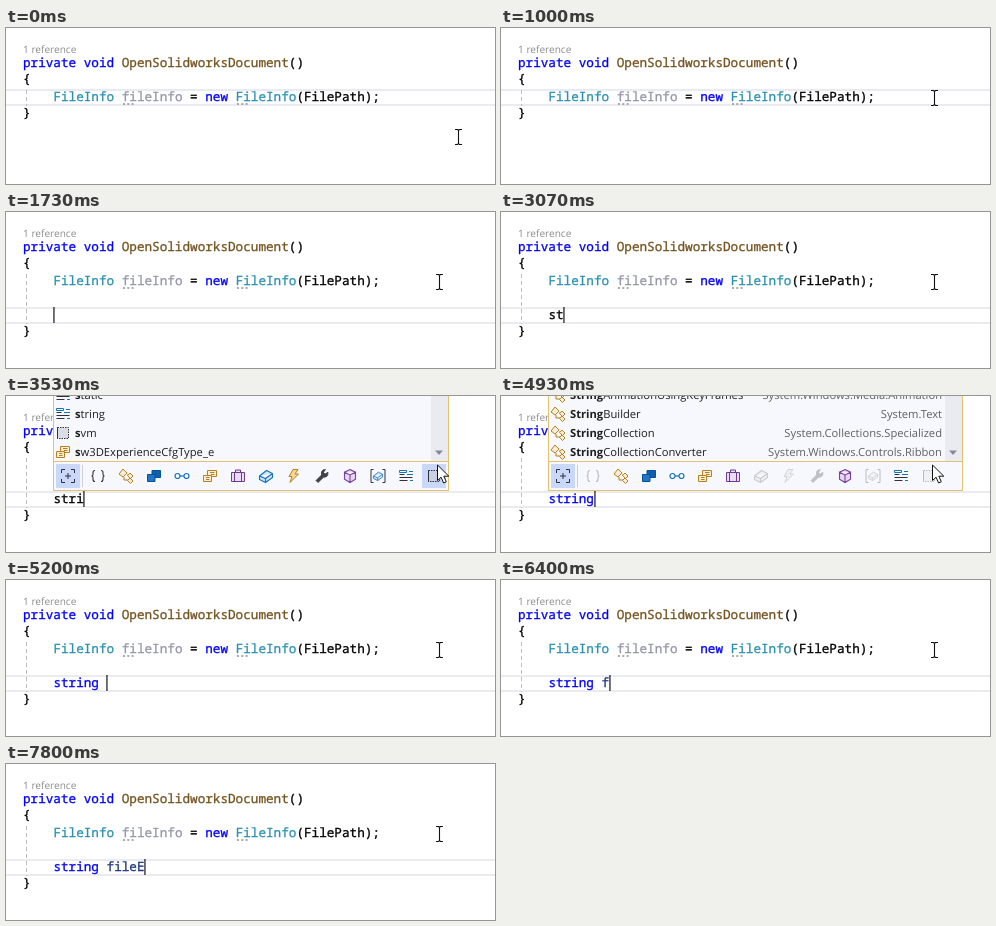
Recreate the animation shown at these times as an HTML page. Size 489 by 156 pixels, loop 8 s.

```html
<!DOCTYPE html>
<html lang="en">
<head>
<meta charset="utf-8">
<title>Code completion</title>
<style>
html, body { margin: 0; width: 100%; height: 100%; overflow: hidden; background: #fff; }
svg { display: block; }
text { white-space: pre; text-rendering: geometricPrecision; }
.code { color: #000; }
.code text, .code tspan { fill: currentColor; stroke: currentColor; stroke-width: .3; }
.code text { font: 12.667px "Noto Sans Mono", monospace; }
.ui { font: 11.2px "Open Sans", "Noto Sans", sans-serif; fill: #1e1e1e; }
.ui .hit { font-weight: 700; }
.lens { font: 10.1px "Open Sans", "Noto Sans", sans-serif; fill: #8c8c8c; }
.kw { color: #00f; }
.type { color: #2b91af; }
.fn { color: #74531f; }
.dim { color: #9496a8; }
.var { color: #1f377f; }
.space { fill: #616161; text-anchor: end; }
.filtered .alt { filter: grayscale(1); opacity: .3; }
.line { fill: none; stroke: #303036; }
</style>
</head>
<body>
<svg width="489" height="156" viewBox="0 0 489 156">
  <defs>
    <g id="expand" class="line">
      <path d="M-6.500-3v-3.500h3.500M3-6.500h3.500v3.500M6.500 3v3.500h-3.500M-3 6.500h-3.500v-3.500M-3 0h6M0-3v6"/>
    </g>
    <g id="braces" class="line" stroke-width="1.1">
      <path id="brace" d="M-3-5.500q-2 0-2 2v2q0 1.500-1.500 1.500q1.500 0 1.500 1.500v2q0 2 2 2"/>
      <use href="#brace" transform="scale(-1 1)"/>
    </g>
    <g id="class" fill="#f8edd8" stroke="#b7801d">
      <path d="M-7-2l4-5 4 4-4 4zM1-1h3M-2 1v3h4"/>
      <path d="M4-3l3 3-2.500 2.500-3-3zM4 2l3 3-2.500 2.500-3-3z"/>
    </g>
    <g id="struct" fill="#0f5fae" stroke="#00539c">
      <path d="M-2-5.500h8.500v7h-8.500z"/>
      <path d="M-6.500-1.500h7.500v7h-7.500z" fill="#2476c2"/>
    </g>
    <g id="iface" class="line" style="stroke:#1272ba" stroke-width="1.2">
      <circle cx="-4.500" r="2.500"/><circle cx="4.500" r="2.500"/><path d="M-2 0h4"/>
    </g>
    <g id="enum" fill="#f8edd8" stroke="#b7801d">
      <path d="M-2.500-5.500h9v6h-9zM0-3.500h4.500M1-1.500h3.500"/>
      <path d="M-6.500-.5h8v6h-8zM-4 1.500h3.500M-4 3.500h3.500"/>
    </g>
    <g id="case" fill="#eadcf2" stroke="#6f3a96">
      <path d="M-6.500-3.500h13v9h-13zM-2.500-3.500v-2.500h5v2.500M-3.500-3.500v9M3.500-3.500v9"/>
    </g>
    <g id="field" fill="#cfe4f6" stroke="#1272ba" stroke-width="1.100">
      <path d="M-6.500 0l7-5.500 6 3v4l-7 5-6-3zM-6.500 0l6 2.500 7-5M-.5 2.500v4"/>
    </g>
    <path id="bolt" d="M-1-6.500h5l-3 4.500h3.500l-8.500 8.500 2-6h-3z" fill="#f6d795" stroke="#b7801d"/>
    <path id="wrench" d="M-6 4.500l5.500-5.500q-1-4 2-5.200l2-.3-2 2.800 1.500 1.800 3-1.800q.5 5-4.500 5l-5.500 5.300z" fill="#42424a" stroke="#303036" stroke-width=".7"/>
    <g id="cube" fill="#e7d6f1" stroke="#7941a3" stroke-width="1.100">
      <path d="M0-6.500l5.500 2.700v7l-5.500 3.300-5.500-3.300v-7zM-5.500-3.800l5.500 2.800 5.500-2.800M0-1v7.500"/>
    </g>
    <g id="boxed">
      <path class="line" d="M-4.500-6.500h-2.500v13h2.500M4.500-6.500h2.500v13h-2.500"/>
      <use href="#field" transform="scale(.7)"/>
    </g>
    <g id="lines" class="line">
      <path d="M-6.500-1.500h5M-6.500 1.500h13M-6.500 4.500h8"/>
      <path d="M-6.500-5.500h7v2h-7zM3-4.500h4M1-1.500h6M4 4.500h3" style="stroke:#1272ba"/>
    </g>
    <g id="snippet">
      <path d="M-5-5h10v10h-10z" fill="#c9cbd2" fill-opacity=".6"/>
      <path class="line" d="M-5.500-5.500h11v11h-11z" stroke-dasharray="1.500 1"/>
      <path class="line" d="M-5.500-5.500v11"/>
    </g>
  </defs>

  <rect width="489" height="156" fill="#fff"/>
  <rect id="current" x="-2" y="62" width="493" height="15" fill="none" stroke="#eaeaf3" stroke-width="2"/>
  <path id="guide" stroke="#bdbdbd" stroke-dasharray="4 3"/>
  <text class="lens" x="17" y="25">1 reference</text>
  <g class="code">
    <text x="17" y="39"><tspan class="kw">private void</tspan> <tspan class="fn">OpenSolidworksDocument</tspan>()</text>
    <text x="17" y="55">{</text>
    <text x="47.400" y="73"><tspan class="type">FileInfo</tspan> <tspan class="dim">fileInfo</tspan> = <tspan class="kw">new</tspan> <tspan class="type">FileInfo</tspan>(FilePath);</text>
    <path d="M117 76h11M231 76h11" stroke="#8f8f8f" stroke-width="1.500" stroke-dasharray="2 2.300"/>
    <text x="47.400" y="107"><tspan id="word"></tspan><tspan id="rest" class="var"></tspan></text>
    <text id="close" x="17">}</text>
  </g>
  <rect id="caret" width="1.100" height="16"/>

  <g id="popup">
    <rect id="frame" x="47.500" y="-2" height="96.500" fill="#f6f8fd" stroke="#e3c36f"/>
    <g id="scroll">
      <path d="M425-1h17v66h-17z" fill="#e9ebf1"/>
      <path d="M429 54.500h8l-4 4.500z" fill="#868999"/>
    </g>
    <g id="list"></g>
    <path id="divider" stroke="#e3c36f"/>
    <path d="M50 68h24v24h-24z" fill="#c9d7f8"/>
    <path id="hover" d="M416 68h24v24h-24z" fill="#c9d7f8"/>
    <path d="M76.500 69v22" stroke="#ccced9"/>
    <g id="bar"></g>
  </g>
  <g id="tip">
    <path d="M431.500 86.500h70v25h-70z" fill="#f5f7fc" stroke="#9ba7c0"/>
    <text class="ui" x="438" y="104">Show only snippets</text>
  </g>
  <path id="beam" d="M-3.500-7.500h2.500l1 1 1-1h2.500M0-6.500v13M-3.500 7.500h2.500l1-1 1 1h2.500" fill="none" stroke="#111" stroke-width="1.100"/>
  <path id="arrow" transform="translate(431.500 69)" d="M0 0v15.500l3.600-3.300 2.500 5.800 2.700-1.200-2.500-5.600h5z" fill="#fff" stroke="#111"/>
</svg>
<script>
const $ = id => document.getElementById(id);
const set = (id, name, value) => $(id).setAttribute(name, value);
const show = (id, on) => { $(id).style.display = on ? '' : 'none'; };
const LOOP = 8000, LEFT = 47.4, CHAR = 7.6;

const tools = ['expand', 'braces', 'class', 'struct', 'iface', 'enum', 'case',
  'field', 'bolt', 'wrench', 'cube', 'boxed', 'lines', 'snippet'];
const unavailable = ['braces', 'field', 'bolt', 'wrench', 'boxed', 'snippet'];

const lists = {
  all: {
    right: 442.5,
    rows: [['lines', 'static'], ['lines', 'string'], ['snippet', 'svm'], ['enum', 'sw3DExperienceCfgType_e']]
  },
  types: {
    right: 461.5,
    rows: [
      ['class', 'StringAnimationUsingKeyFrames', 'System.Windows.Media.Animation'],
      ['class', 'StringBuilder', 'System.Text'],
      ['class', 'StringCollection', 'System.Collections.Specialized'],
      ['class', 'StringCollectionConverter', 'System.Windows.Controls.Ribbon']
    ]
  }
};

// Each step changes only the listed parts of the state.
const steps = [
  [0, { row: 2, text: '', caret: false, list: '', hits: 1, tip: false }],
  [530, { caret: true }],
  [1000, { caret: false }],
  [1470, { row: 3, caret: true }],
  [1730, { row: 4 }],
  [2270, { caret: false }],
  [2530, { text: 's', caret: true }],
  [3070, { text: 'st' }],
  [3530, { text: 'stri', list: 'all' }],
  [4130, { tip: true }],
  [4330, { list: 'types', hits: 4, caret: false }],
  [4530, { text: 'strin', tip: false, caret: true }],
  [4670, { text: 'string' }],
  [4930, { hits: 6 }],
  [5200, { text: 'string ', list: '' }],
  [5730, { caret: false }],
  [6130, { text: 'string f', caret: true }],
  [6600, { text: 'string fi' }],
  [6870, { text: 'string fil' }],
  [7200, { text: 'string file' }],
  [7670, { caret: false }],
  [7800, { text: 'string fileE', caret: true }]
];

const icon = (name, x, y, cls = '') =>
  `<use href="#${name}" class="${cls}" transform="translate(${x} ${y})"/>`;

$('bar').innerHTML = tools.map((name, i) =>
  icon(name, i ? 64 + i * 28 : 62, 80, unavailable.includes(name) ? 'alt' : '')).join('');

function drawList({ right, rows }, hits) {
  set('frame', 'width', right - 47.5);
  set('divider', 'd', `M48 65.5H${right}`);
  set('scroll', 'transform', `translate(${right - 442.5})`);
  $('list').innerHTML = rows.map(([kind, label, space = ''], i) => {
    const y = i * 19 - 1;
    return icon(kind, 57, y) +
      `<text class="ui" x="69" y="${y + 4}"><tspan class="hit">${label.slice(0, hits)}</tspan>${label.slice(hits)}</text>` +
      `<text class="ui space" x="${right - 20.5}" y="${y + 4}">${space}</text>`;
  }).join('');
}

function draw(s) {
  const top = 27 + s.row * 17;
  const col = s.row === 2 ? 43 : s.text.length;
  set('current', 'y', top + 1);
  set('guide', 'd', `M20.5 62V${top + 17}`);
  set('close', 'y', top + 28);
  set('caret', 'x', Math.floor(LEFT + col * CHAR) + .4);
  set('caret', 'y', top);
  set('word', 'class', s.text.startsWith('string') ? 'kw' : '');
  $('word').textContent = s.text.slice(0, 6);
  $('rest').textContent = s.text.slice(6);
  show('caret', s.caret);
  show('popup', s.list);
  show('arrow', s.list);
  show('beam', !s.list);
  show('tip', s.tip);
  show('hover', s.list === 'all');
  set('popup', 'class', s.list === 'types' ? 'filtered' : '');
  if (s.list) drawList(lists[s.list], s.hits);
}

function moveBeam(t) {
  const k = t < 70 ? 0 : Math.min(5, 1 + Math.floor((t - 70) / 65)) / 5;
  const p = k * (2 - k);
  set('beam', 'transform', `translate(${452.5 - 19 * p} ${109 - 39 * p})`);
}

let shown = -1;
const start = performance.now();
function tick(now) {
  const t = Math.max(0, now - start) % LOOP;
  const past = steps.filter(([at]) => at <= t);
  if (past.length !== shown) {
    shown = past.length;
    draw(Object.assign({}, ...past.map(([, change]) => change)));
  }
  moveBeam(t);
  requestAnimationFrame(tick);
}
tick(start);
</script>
</body>
</html>
```
